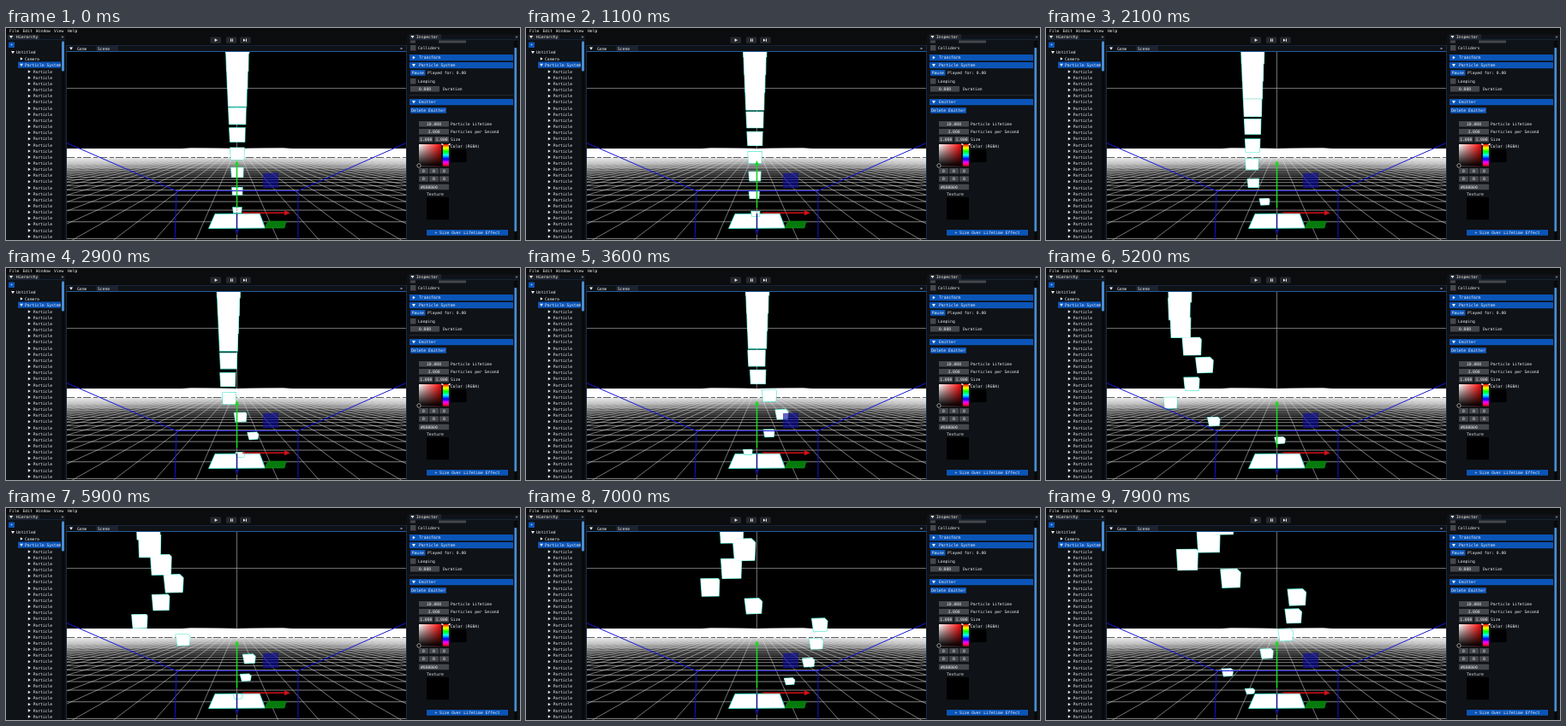
Animation, 600 px wide and 248 px high, one loop 8 s. Source, as an HTML page:

```html
<!DOCTYPE html>
<html lang="en">
<head>
<meta charset="utf-8">
<title>Particle editor</title>
<style>
html, body { margin: 0; width: 100%; height: 100%; overflow: hidden; background: #0f1216; }
svg { display: block; width: 100vw; height: 100vh; }
text { font: 4.7px "DejaVu Sans Mono", "Liberation Mono", monospace; fill: #f0f2f4; white-space: pre; }
</style>
</head>
<body>
<svg id="stage" viewBox="0 0 600 248">
  <defs>
    <clipPath id="view"><rect x="71" y="28" width="396" height="220"/></clipPath>
    <clipPath id="tree"><rect x="0" y="15" width="64" height="233"/></clipPath>
    <linearGradient id="haze" x1="0" y1="0" x2="0" y2="1">
      <stop offset="0" stop-color="#fff"/><stop offset=".36" stop-color="#fff"/>
      <stop offset=".46" stop-color="#fff" stop-opacity=".4"/><stop offset="1" stop-color="#fff" stop-opacity="0"/>
    </linearGradient>
    <linearGradient id="red"><stop stop-color="#fff"/><stop offset="1" stop-color="#f00"/></linearGradient>
    <linearGradient id="shade" x1="0" y1="0" x2="0" y2="1"><stop stop-opacity="0"/><stop offset="1"/></linearGradient>
    <linearGradient id="hue" x1="0" y1="0" x2="0" y2="1"></linearGradient>
  </defs>
  <g id="chrome"></g>
  <g clip-path="url(#view)">
    <rect x="71" y="28" width="396" height="220" fill="#000"/>
    <g id="grid"></g>
    <path id="outlines" fill="none" stroke="#48e8cf" stroke-width="1.2" stroke-linejoin="round"/>
    <path id="faces" fill="#fff"/>
    <g id="gizmo"></g>
  </g>
</svg>
<script>
const $ = id => document.getElementById(id);
const BLUE = '#0b55b8', FIELD = '#45474b', LINE = '#24599c', EDGE = '#1a3350', BAR = '#4a8bd0';

function add(parent, tag, attrs, content) {
  const node = document.createElementNS('http://www.w3.org/2000/svg', tag);
  for (const name in attrs) node.setAttribute(name, attrs[name]);
  if (content !== undefined) node.textContent = content;
  return parent.appendChild(node);
}
const box = (g, x, y, width, height, fill, rx = 0) => add(g, 'rect', { x, y, width, height, fill, rx });
const label = (g, x, mid, content, anchor = 'start') => add(g, 'text', { x, y: mid + 1.7, 'text-anchor': anchor }, content);
const path = (g, d, stroke, width = 1, fill = 'none') => add(g, 'path', { d, stroke, 'stroke-width': width, fill });
const shape = (g, d, fill = '#f0f2f4') => path(g, d, 'none', 0, fill);
const arrow = (g, x, y, open) => shape(g, open
  ? `M${x - 2} ${y - 1.5}h4l-2 3.3z` : `M${x - 1.2} ${y - 1.8}l3 1.8-3 1.8z`);
const cross = (g, x, y) => path(g, `M${x - 1} ${y - 1}l2 2m0-2l-2 2`, '#e4e6e8', .6);

function drawHierarchy(g) {
  box(g, 0, 0, 600, 7.5, '#0b0c0e');
  [['File', 4], ['Edit', 19.5], ['Window', 35], ['View', 56], ['Help', 72]].forEach(([s, x]) => label(g, x, 3.6, s));
  box(g, 2, 7.5, 37, 6, '#22252a');
  arrow(g, 6, 10.5, true);
  label(g, 12, 10.5, 'Hierarchy');
  cross(g, 66, 10.5);
  box(g, 2, 13.5, 67, .6, EDGE);
  box(g, 3, 16.5, 7, 6.5, BLUE, .6);
  label(g, 6.5, 19.7, '+', 'middle');
  const rows = add(g, 'g', { 'clip-path': 'url(#tree)' });
  box(rows, 14, 39.5, 50, 7.2, BLUE);
  [['Untitled', 12, 28.5, true], ['Camera', 22, 36], ['Particle System', 22, 43.2, true]].forEach(([s, x, y, open]) => {
    arrow(rows, x - 4, y, open);
    label(rows, x, y, s);
  });
  for (let i = 0; i < 28; i++) {
    const y = 51 + i * 7.15;
    arrow(rows, 27, y);
    label(rows, 31.5, y, 'Particle');
  }
  box(g, 64.8, 15, 3.6, 233, '#08090a');
  box(g, 65, 15.5, 3, 35, BAR, 1);
}

function drawToolbar(g) {
  box(g, 70, 7.5, 398, 12.5, '#0b0c0e');
  [238.5, 257, 273].forEach(x => box(g, x, 10.5, 12.5, 7.5, '#24272b', 1));
  shape(g, 'M243.7 12.3l3.2 1.9-3.2 1.9zM261.9 12.5h1v3.4h-1zM263.8 12.5h1v3.4h-1zM277 12.5l2.6 1.7-2.6 1.7zM280 12.5h.9v3.4h-.9z');
  box(g, 70, 20, 398, .6, EDGE);
  box(g, 105, 21, 26, 6.3, '#1b2430');
  arrow(g, 76, 24, true);
  label(g, 83, 24, 'Game');
  label(g, 107, 24, 'Scene');
  cross(g, 461.5, 24);
  box(g, 70, 27, 398, 1, LINE);
  box(g, 70, 20, .8, 228, EDGE);
  box(g, 467, 20, .8, 228, EDGE);
}

function drawInspector(g) {
  const field = (x, y, w, s) => { box(g, x, y, w, 6.5, FIELD, .5); label(g, x + w / 2, y + 3.3, s, 'middle'); };
  const button = (x, y, w, s) => { box(g, x, y, w, 6.8, BLUE, .5); label(g, x + w / 2, y + 3.4, s, 'middle'); };
  const check = (y, s) => { box(g, 472, y, 6.5, 6.5, FIELD, .5); label(g, 481, y + 3.2, s); };
  const header = (y, s, open) => { box(g, 471, y, 121, 7.2, BLUE, .5); arrow(g, 476, y + 3.6, open); label(g, 482, y + 3.6, s); };

  box(g, 471, 7.5, 37, 6, '#22252a');
  arrow(g, 474.5, 10.5, true);
  label(g, 479, 10.5, 'Inspector');
  cross(g, 596, 10.5);
  box(g, 471, 13.5, 127, .6, EDGE);
  [[472, 6], [505, 32]].forEach(([x, w]) => box(g, x, 14.5, w, 3, FIELD));
  box(g, 593, 15, 4, 233, '#08090a');
  box(g, 593.4, 23, 2.8, 215, BAR, 1);
  check(20, 'Colliders');
  header(31, 'Transform', false);
  header(40, 'Particle System', true);
  button(472, 49, 17.5, 'Pause');
  label(g, 492, 52.4, 'Played for: 0.00');
  check(59, 'Looping');
  field(472, 68, 34, '0.000');
  label(g, 510, 71.3, 'Duration');
  box(g, 471, 78, 121, .5, '#3a3c42');
  header(83, 'Emitter', true);
  button(472, 93, 42, 'Delete Emitter');
  field(482, 109, 35, '10.000');
  label(g, 519, 112.3, 'Particle Lifetime');
  field(482, 118, 35, '3.000');
  label(g, 519, 121.3, 'Particles per Second');
  field(482, 127, 16.5, '1.000');
  field(500, 127, 17, '1.000');
  label(g, 519, 130.3, 'Size');

  for (let i = 0; i <= 6; i++) add($('hue'), 'stop', { offset: i / 6, 'stop-color': `hsl(${i * 60},100%,50%)` });
  box(g, 482, 136, 26, 25.5, 'url(#red)');
  box(g, 482, 136, 26, 25.5, 'url(#shade)');
  box(g, 510, 136, 7, 25.5, 'url(#hue)');
  add(g, 'circle', { cx: 482, cy: 161, r: 2.2, fill: '#000', stroke: '#ddd', 'stroke-width': .7 });
  shape(g, 'M508.5 134.8l2.5 1.4-2.5 1.4zM518.5 134.8l-2.5 1.4 2.5 1.4z', '#fff');
  label(g, 519, 138.7, 'Color (RGBA)');
  box(g, 519, 142, 18.5, 15, '#000');
  for (let i = 0; i < 6; i++) field(482 + i % 3 * 12, 164 + (i > 2 ? 9.3 : 0), 11, '0');
  box(g, 482, 182.7, 35, 6.5, FIELD, .5);
  label(g, 484, 186, '#000000');
  label(g, 491, 194.5, 'Texture');
  box(g, 491, 198, 26, 26, '#000');
  button(491, 236, 95, '+ Size Over Lifetime Effect');
}

function drawGrid(g) {
  const top = 141, vanish = 139;
  path(g, 'M269.5 28V141M71 70.5H467', '#a0a0a0', .7);
  let rays = '';
  for (let i = -60; i <= 60; i++) {
    const spread = i * 48 / 109;
    rays += `M${269.5 + spread * (top - vanish)} ${top}L${269.5 + spread * 109} 248`;
  }
  path(g, rays, '#c4c4c4', .6);
  for (let i = 0; i < 38; i++) {
    const y = vanish + 1 / (.0093 + .0021 * i);
    path(g, `M71 ${y}H467`, '#d8d8d8', .6);
  }
  box(g, 71, top, 396, 26, 'url(#haze)');
  add(g, 'path', { d: 'M71 151.5H467', stroke: '#222', 'stroke-width': .7, 'stroke-dasharray': '9 3 5 2', fill: 'none' });
  path(g, 'M244 217.5L296 217L302.5 234L236.5 234.5Z', '#48e8cf', .9, '#fff');
}

function drawGizmo(g) {
  path(g, 'M71 134.5L199 190.5H341L467 134.5M199 190.5L197 248M341 190.5V248', '#1414d8', 1);
  add(g, 'path', { d: 'M300 170l18-1v18l-18 1z', fill: '#1010a0', 'fill-opacity': .65 });
  shape(g, 'M306 226h21l-2 8h-23z', '#067a0c');
  path(g, 'M306 226h21l-2 8h-23z', '#0a9a12', .6);
  path(g, 'M269.5 217V237', '#10108c', 1.5);
  shape(g, 'M266.8 236h5.4l-2.7 6z', '#10108c');
  path(g, 'M276 216.3H326', '#d01018', 1.4);
  shape(g, 'M325 213.3l7 3-7 3z', '#d01018');
  path(g, 'M269.5 210V158', '#18d820', 1.6);
  shape(g, 'M266.9 160.5l2.6-5.5 2.6 5.5z', '#18d820');
  add(g, 'path', { d: 'M269.5 210V218', stroke: '#777', 'stroke-width': .8, 'stroke-dasharray': '1.5 1' });
}

// Sideways drift of the whole plume: [seconds, pixels].
const drift = [[0, 0], [.9, 0], [1.58, -14], [2.15, -29], [2.8, -14], [3.42, 11], [3.6, 0], [4.03, -40],
  [4.6, -115], [5.25, -113], [5.9, -103], [6.47, -82], [7, -44], [7.1, -36], [7.69, -62], [7.9, -94]];

function driftAt(t) {
  if (t <= 0) return 0;
  const last = drift.length - 1;
  let i = 0;
  while (i < last - 1 && t > drift[i + 1][0]) i++;
  const slope = n => {
    const a = drift[Math.max(0, n - 1)], b = drift[Math.min(last, n + 1)];
    return (b[1] - a[1]) / (b[0] - a[0]);
  };
  const [t0, x0] = drift[i], [t1, x1] = drift[i + 1], span = t1 - t0;
  const u = Math.min(1, (t - t0) / span), v = 1 - u;
  return v * v * (1 + 2 * u) * x0 + u * u * (3 - 2 * u) * x1 + span * u * v * (v * slope(i) - u * slope(i + 1));
}

const LOOP = 8000, STEP = 100, RISE = 36, GAP = 22, BIRTH_Y = 222, START_Y = 213;
const particles = [];

function cubePath(x, y, turn) {
  const age = 214 - y, w = 9.5 + age * .092, h = 6 + age * .118;
  const cut = w * .17 * turn, lean = .5 + turn * .7;
  const l = x - w / 2, r = x + w / 2, top = y - h / 2, low = y + h / 2;
  return `M${l - lean} ${top}L${r + lean * (1 - turn) - cut} ${top - turn * .5}L${r + lean * .5} ${top + cut}` +
    `L${r - lean * .3} ${low - turn * .6}L${l + lean * .8} ${low}Z`;
}

function render(ms) {
  const t = Math.floor(ms % LOOP / STEP) * STEP / 1000;
  const now = driftAt(t);
  let d = '';
  for (const p of particles) {
    const y = START_Y + GAP * p.index - RISE * t;
    if (y <= BIRTH_Y && y > 0) d += cubePath(270 + now + p.offset, y, p.turn);
  }
  // Faces cover the outlines wherever cubes overlap.
  $('outlines').setAttribute('d', d);
  $('faces').setAttribute('d', d);
}

drawHierarchy($('chrome'));
drawToolbar($('chrome'));
drawInspector($('chrome'));
drawGrid($('grid'));
drawGizmo($('gizmo'));
for (let index = -10; index <= 14; index++) {
  const offset = -driftAt((START_Y + GAP * index - BIRTH_Y) / RISE);
  particles.push({ index, offset, turn: Math.min(1, Math.abs(offset) / 25) });
}

const start = performance.now();
function tick() {
  render(performance.now() - start);
  requestAnimationFrame(tick);
}
tick();
</script>
</body>
</html>
```
